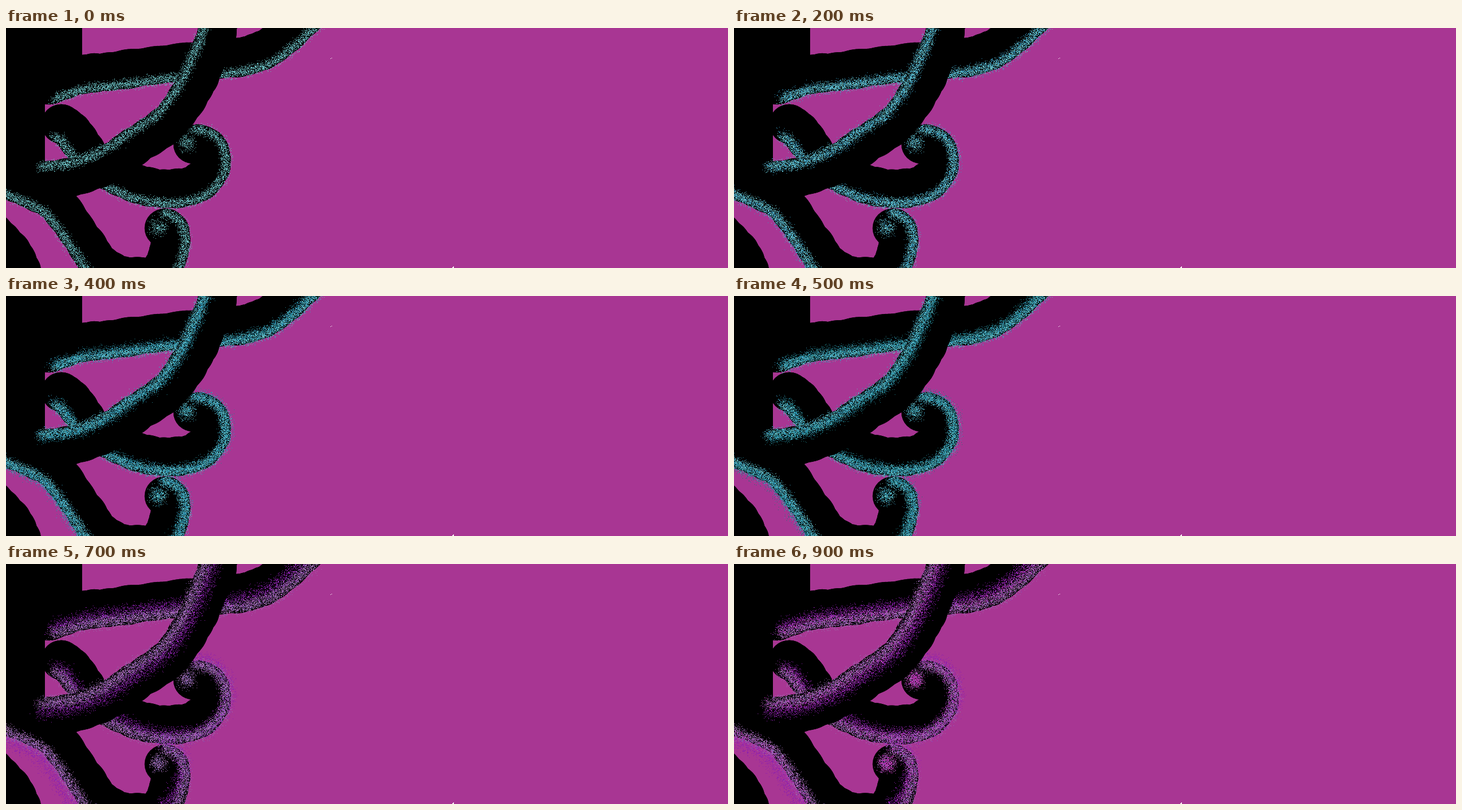
An HTML page with a canvas that plays this animation: 1280 px wide and 427 px high, repeating every 1000 ms.

```html
<!DOCTYPE html>
<html lang="en">
<head>
<meta charset="utf-8">
<title>Sprayed vines</title>
<style>
  html, body { margin: 0; width: 100%; height: 100%; overflow: hidden; background: #a83693; }
  canvas { display: block; width: 1280px; height: 427px; }
</style>
</head>
<body>
<canvas id="stage" width="1280" height="427"></canvas>
<script>
const start = performance.now();
const W = 1280, H = 427, STEP = 100;
const RADIUS = 34;   // half the width of a vine
const EDGE = 26;     // distance from a vine's middle to its lit side
const SAMPLES = 20;  // per span between two key points

// Back to front. `drift` is how far the shade lies inward of the lit side, at the root and at the tip.
const vines = [
  { path: '-25,362 8,395 28,432' },
  { path: '-40,250 0,268 42,286 90,313 138,378 168,420 210,441 265,441', drift: [-14, -22] },
  { path: '75,102 135,83 187,77 285,64 400,54 440,45 475,28 535,-25', drift: [13, 19] },
  { path: '97,170 116,183 142,218', drift: [12, 12] },
  { path: '175,250 228,276 285,286 335,278 361,252 362,222 348,208 330,207', drift: [20, -16], curl: true },
  { path: '375,-25 374,10 349,72 329,113 289,168 229,210 190,237 128,263 62,272', drift: [18, 18] },
  { path: '270,440 285,410 291,385 291,365 285,357 280,356', drift: [26, -14], curl: true }
].map(vine => ({ ...vine, points: sampleCurve(vine.path) }));

const teal = [
  { color: '#67b7ba', density: 10, spread: 5, curl: 260 },
  { color: '#3a9fc4', shift: .05, density: 2.5 },
  { color: '#3598c2', shift: .1, density: 2.5, curl: 90 },
  { color: '#26899c', shift: .15, density: 2.5 },
  { color: '#1f7f8e', shift: .25, density: 3, spread: 6.5, curl: 120 },
  { color: '#1b6f74', shift: .35, density: 2.5, spread: 6.5 },
  { color: '#4a79bd', shift: 1, density: 5, spread: 6 }
];
const violet = [
  { color: '#8b1eae', shift: 1, density: 6, spread: 7 },
  { color: '#9030b0', shift: .5, density: 4, spread: 7 },
  { color: '#9d69aa', shift: .08, density: 11, spread: 6, curl: 320 },
  { color: '#7b62b8', shift: .1, density: 1.5, curl: 90 }
];
const tealGlow = { color: '#5fadb2', shift: .06, density: 4, spread: 5.5, curl: 800 };
const violetGlow = { color: '#b02ca8', shift: .45, density: 3.5, spread: 7.5, curl: 450 };

const scenes = [
  ...teal.map((_, i) => teal.slice(0, i + 1)),
  violet,
  [...teal, tealGlow],
  [...violet, violetGlow]
];

let seed = 1;
function random() {
  seed = (seed * 1664525 + 1013904223) >>> 0;
  return seed / 4294967296;
}
const scatter = spread => (random() + random() + random() - 1.5) * 2 * spread;
const mix = (a, b, k) => a + (b - a) * k;

function catmullRom(a, b, c, d, t) {
  return b + t / 2 * (c - a + t * (2 * a - 5 * b + 4 * c - d + t * (3 * (b - c) + d - a)));
}

// Points along a smooth curve, each with its unit normal towards the lit side.
function sampleCurve(text) {
  const keys = text.split(' ').map(p => p.split(',').map(Number));
  const last = keys.length - 1;
  const key = i => keys[Math.max(0, Math.min(last, i))];
  const at = s => {
    const i = Math.min(Math.floor(s), last - 1);
    return [0, 1].map(k => catmullRom(key(i - 1)[k], key(i)[k], key(i + 1)[k], key(i + 2)[k], s - i));
  };
  return Array.from({ length: last * SAMPLES + 1 }, (_, n) => {
    const s = n / SAMPLES;
    const [x, y] = at(s);
    const [x0, y0] = at(Math.max(0, s - .02));
    const [x1, y1] = at(Math.min(last, s + .02));
    const length = Math.hypot(x1 - x0, y1 - y0);
    return { x, y, nx: (y0 - y1) / length, ny: (x1 - x0) / length };
  });
}

function dot(g, x, y) {
  g.fillRect(Math.round(x), Math.round(y), 1, 1);
}

function drawTube(g, points) {
  g.fillStyle = '#000';
  points.forEach(({ x, y }, i) => {
    g.beginPath();
    g.arc(x, y, RADIUS + .8 * Math.sin(i * .7) + .6 * Math.sin(i * .31), 0, 7);
    g.fill();
  });
}

function spray(g, { points, drift, curl }, layer) {
  const { shift = 0, density, spread = 6 } = layer;
  const place = i => {
    const p = points[i];
    const out = EDGE - shift * mix(drift[0], drift[1], i / (points.length - 1));
    return [p.x + p.nx * out, p.y + p.ny * out];
  };
  g.fillStyle = layer.color;
  for (let i = 1; i < points.length; i++) {
    const [x0, y0] = place(i - 1), [x1, y1] = place(i);
    const count = Math.floor(Math.hypot(x1 - x0, y1 - y0) * density + random());
    for (let n = 0; n < count; n++) {
      const k = random();
      dot(g, mix(x0, x1, k) + scatter(spread), mix(y0, y1, k) + scatter(spread));
    }
  }
  if (!curl) return;
  const tip = points[points.length - 1];
  for (let n = layer.curl || 0; n > 0; n--)
    dot(g, tip.x - 10 + scatter(7.5), tip.y - 2 + scatter(7.5));
}

function drawBackground(g) {
  g.fillStyle = '#a83693';
  g.fillRect(0, 0, W, H);
  g.fillStyle = '#000';
  g.fillRect(0, 0, 135, 70);
  g.fillRect(0, 0, 69, 270);
  g.fillStyle = '#fff';
  dot(g, 575, 54);
  dot(g, 577, 53);
  for (let row = 0; row < 3; row++) g.fillRect(793 - row, 424 + row, 1 + row, 1);
}

function paint(layers) {
  const canvas = document.createElement('canvas');
  canvas.width = W;
  canvas.height = H;
  const g = canvas.getContext('2d');
  drawBackground(g);
  vines.forEach((vine, v) => {
    drawTube(g, vine.points);
    if (!vine.drift) return;
    layers.forEach((layer, n) => {
      seed = 7919 * (v + 1) + 104729 * (n + 1);  // same dots in every scene
      spray(g, vine, layer);
    });
  });
  return canvas;
}

const pictures = scenes.map(paint);
const stage = document.getElementById('stage').getContext('2d');

function render() {
  const time = performance.now() - start;
  stage.drawImage(pictures[Math.floor(time / STEP) % pictures.length], 0, 0);
  requestAnimationFrame(render);
}
render();
</script>
</body>
</html>
```
